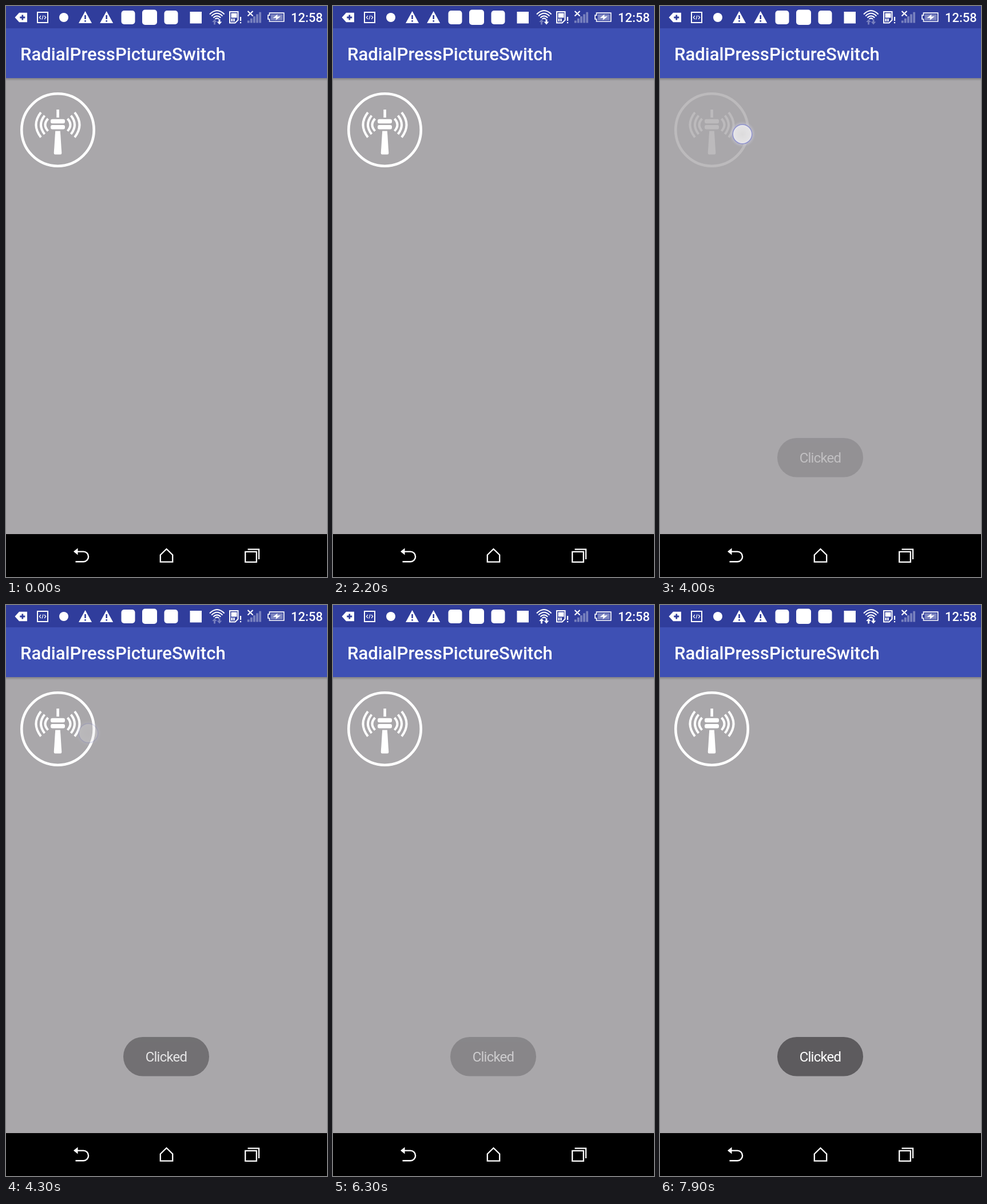
An HTML page that plays this animation: 561 px wide and 998 px high, repeating every 8 s.

```html
<!DOCTYPE html>
<html lang="en">
<head>
<meta charset="utf-8">
<title>Round button demo</title>
<style>
  html, body { margin: 0; width: 100%; height: 100%; overflow: hidden; background: #a9a7aa; }
  svg { display: block; width: 100vw; height: 100vh; }
  text { font-family: Roboto, sans-serif; fill: #fff; }
  .line { fill: none; stroke: #fff; }
</style>
</head>
<body>
<svg viewBox="0 0 561 998">
  <defs>
    <linearGradient id="shade" x2="0" y2="1">
      <stop stop-color="#000" stop-opacity=".22"/>
      <stop offset="1" stop-color="#000" stop-opacity="0"/>
    </linearGradient>
    <radialGradient id="halo">
      <stop offset=".72" stop-color="#cfcfe2" stop-opacity=".55"/>
      <stop offset="1" stop-color="#c2c2d2" stop-opacity="0"/>
    </radialGradient>
    <radialGradient id="dot">
      <stop stop-color="#dcdbdc"/>
      <stop offset=".8" stop-color="#e4e3e5"/>
      <stop offset="1" stop-color="#ebebf2"/>
    </radialGradient>
    <filter id="soft"><feGaussianBlur stdDeviation=".7"/></filter>
    <g id="warn">
      <path d="M0 -11L11.5 10H-11.5Z" fill="#fff"/>
      <path d="M0 -4V3M0 5V7.6" stroke="#303d9c" stroke-width="2.6"/>
    </g>
    <g id="waves" class="line" stroke-width="4">
      <path d="M120 186Q137 207.5 120 229.5M113.5 191.5Q126.5 207.5 113.5 224M107.5 197Q117.5 207.5 107.5 218.5"/>
    </g>
    <path id="arrow" d="M0 -4.8L4.3 0H1.4V4.4H-1.4V0H-4.3Z" fill="#fff"/>
  </defs>

  <rect width="561" height="998" fill="#a9a7aa"/>
  <rect y="126" width="561" height="5" fill="url(#shade)"/>
  <rect width="561" height="126" fill="#3e50b4"/>
  <rect width="561" height="39" fill="#303d9c"/>
  <rect y="923" width="561" height="75"/>

  <!-- status bar -->
  <path d="M15.5 20L23 11.8H37V28.2H23Z" fill="#fff"/>
  <path d="M28.8 15.5V24.5M24.3 20H33.3" stroke="#303d9c" stroke-width="2.8"/>
  <rect class="line" x="55" y="11" width="18" height="18" stroke-width="2"/>
  <path class="line" d="M61 17L58.3 20L61 23M67 17L69.7 20L67 23M65 16.4L63 23.6" stroke-width="1.2"/>
  <circle cx="101" cy="20" r="8" fill="#fff"/>
  <use href="#warn" x="138.5" y="20"/>
  <use href="#warn" x="175.7" y="20"/>
  <g fill="#fff">
    <rect x="201.5" y="8" width="24" height="24" rx="5"/>
    <rect x="238" y="6.5" width="26" height="26.5" rx="5"/>
    <rect x="276.5" y="8" width="24" height="24" rx="5"/>
    <rect x="321.5" y="10" width="20.5" height="20.5"/>
  </g>
  <path class="line" d="M356 14.5Q368.8 1.5 381.6 14.5M359.2 17.6Q368.8 8 378.4 17.6M362.3 20.4Q368.8 14.3 375.3 20.4M365.5 22.8Q368.8 20 372.1 22.8" stroke-width="2"/>
  <use id="up" href="#arrow" x="364.5" y="28"/>
  <use id="down" href="#arrow" transform="translate(373 27.6) rotate(180)"/>
  <path class="line" d="M391 10H405.5V24.5L400.5 29.5H391Z" stroke-width="2"/>
  <path d="M393.5 12.5H403.5V20.5H393.5ZM393.5 22H396V27H393.5ZM397.2 22H399.7V27H397.2Z" fill="#fff"/>
  <path class="line" d="M410 19V26M410 28V30.3" stroke-width="2.2"/>
  <g id="bars" fill="#fff" opacity=".35"></g>
  <path class="line" d="M422.5 9L431.5 17.5M431.5 9L422.5 17.5" stroke-width="2.2"/>
  <path class="line" d="M460.5 12.2H485.7V27H460.5V23H458V16.2H460.5Z" stroke-width="1.7"/>
  <rect x="462.7" y="14.4" width="20.8" height="10.4" fill="#fff" opacity=".38"/>
  <path d="M466.5 21L474.5 14.5L474 18.5L480 18L471.5 25L472.3 20.8Z" fill="#fff"/>
  <text x="498" y="28" font-size="21.9" font-weight="500">12:58</text>
  <text x="25" y="94.5" font-size="31.1" font-weight="500">RadialPressPictureSwitch</text>

  <g id="button">
    <g filter="url(#soft)">
      <circle class="line" cx="90.5" cy="216.5" r="63.2" stroke-width="4.6"/>
      <use href="#waves"/>
      <use href="#waves" transform="translate(181 0) scale(-1 1)"/>
      <g fill="#fff">
        <rect x="88.3" y="181" width="4.6" height="14"/>
        <rect x="78" y="197.8" width="25" height="7.4" rx="3"/>
        <rect x="78" y="208" width="25" height="7.4" rx="3"/>
        <path d="M86.2 218.5H94.8L97.3 257Q97.3 259.5 95 259.5H86Q83.7 259.5 83.7 257Z"/>
      </g>
    </g>
  </g>

  <g id="toast">
    <rect x="205" y="755" width="150" height="68.5" rx="34" fill="#5d5b5e"/>
    <text x="280" y="798" font-size="24" letter-spacing="-.8" text-anchor="middle">Clicked</text>
  </g>

  <g id="touch">
    <circle r="22.5" fill="url(#halo)"/>
    <circle r="16.5" fill="url(#dot)" stroke="#9295cb" stroke-width="1.7"/>
  </g>

  <!-- navigation bar -->
  <path class="line" d="M122 953.6H135.3A8.8 8.8 0 0 1 135.3 971.2H121.5" stroke-width="2.4"/>
  <path d="M118 953.6L125.5 947.6V959.6Z" fill="#fff"/>
  <path class="line" d="M269.8 959.5L280.5 949L291.2 959.5V971.7H269.8Z" stroke-width="2.3"/>
  <path class="line" d="M418.2 953.8H437.8V971.8H418.2ZM422.5 949.6H442V967" stroke-width="2.3"/>
</svg>
<script>
  const LOOP = 8000, STEP = 100;
  const $ = id => document.getElementById(id);
  const fade = (id, a) => $(id).setAttribute('opacity', a.toFixed(3));
  const ramp = (t, from, to) => Math.min(1, Math.max(0, (t - from) / (to - from)));

  // Each tap appears at once, holds, then fades out.
  const taps = [
    { x: 149.5, y: 275, at: 1600, hold: 1900, end: 2200, size: .95, alpha: .78 },
    { x: 149.5, y: 274, at: 2400, hold: 2700, end: 3000, size: .95, alpha: .78 },
    { x: 144, y: 224, at: 3800, hold: 4050, end: 4400, size: 1.02, alpha: 1, press: 4150 },
    { x: 92.5, y: 214, at: 6800, hold: 6950, end: 7300, size: 1, alpha: 1, press: 7050 }
  ];

  for (let i = 0; i < 5; i++) {
    const bar = document.createElementNS('http://www.w3.org/2000/svg', 'rect');
    const h = 4 + i * 3.7;
    const box = { x: 421.8 + i * 5.1, y: 29.5 - h, width: 3.8, height: h };
    for (const key in box) bar.setAttribute(key, box[key]);
    $('bars').append(bar);
  }

  function draw(t) {
    const tap = taps.find(p => t >= p.at && t < p.end);
    fade('touch', tap ? tap.alpha * (1 - ramp(t, tap.hold, tap.end)) : 0);
    if (tap) $('touch').setAttribute('transform', `translate(${tap.x} ${tap.y}) scale(${tap.size})`);
    fade('button', tap && t < tap.press ? .22 : 1);

    fade('toast', ramp(t, 3800, 4500) - ramp(t, 5900, 6600) + ramp(t, 6850, 7400));

    fade('up', t < 4900 ? .35 : 1);
    fade('down', t >= 2400 && t < 4900 ? .35 : 1);
  }

  const start = performance.now();
  function tick() {
    const t = (performance.now() - start) % LOOP;
    draw(Math.floor(t / STEP) * STEP);
    requestAnimationFrame(tick);
  }
  draw(0);
  tick();
</script>
</body>
</html>
```
